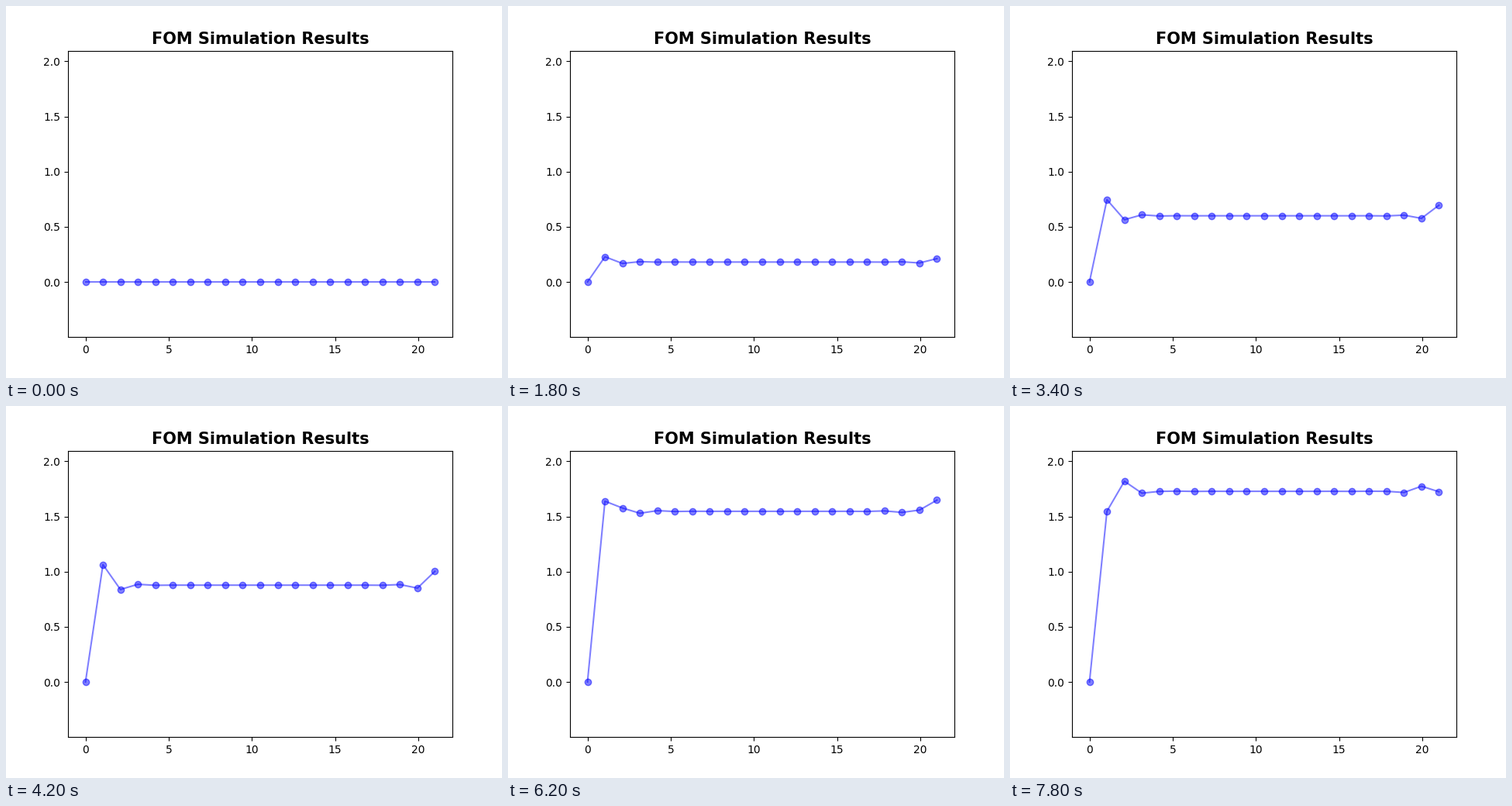
A matplotlib script for the animation above (8000 ms loop, 640 by 480 pixels).

```python
import numpy as np
import matplotlib.pyplot as plt
from matplotlib.animation import FuncAnimation

FRAMES, INTERVAL, NODES = 40, 200, 21
PUSH = 0.00402      # acceleration per squared time step
TIP_LOAD = 0.05     # extra pull on the free end


def simulate():
    """Finite-element bar, clamped at the left, with a quadratic reaction."""
    free = NODES - 1
    mass = (4 * np.eye(free) + np.eye(free, k=1) + np.eye(free, k=-1)) / 6
    mass[-1, -1] = 2 / 6
    share = np.ones(free)
    share[-1] = 0.5
    load = share.copy()
    load[-1] += TIP_LOAD

    path = np.zeros((FRAMES, NODES))
    speed = np.zeros(free)
    for n in range(1, FRAMES):
        u = path[n - 1, 1:]
        speed += PUSH * np.linalg.solve(mass, load - share * u**2)
        path[n, 1:] = u + speed
    return path


path = simulate()

fig, ax = plt.subplots(figsize=(6.4, 4.8), dpi=100)
line, = ax.plot(np.linspace(0, 21, NODES), path[0], "bo-", alpha=0.5)
ax.set_ylim(-0.4999, 2.0971)
ax.set_title("FOM Simulation Results", fontsize=15, fontweight="bold")


def update(n):
    line.set_ydata(path[n])
    return line,


anim = FuncAnimation(fig, update, frames=FRAMES, interval=INTERVAL,
                     repeat=True, repeat_delay=0)
plt.show()
```
